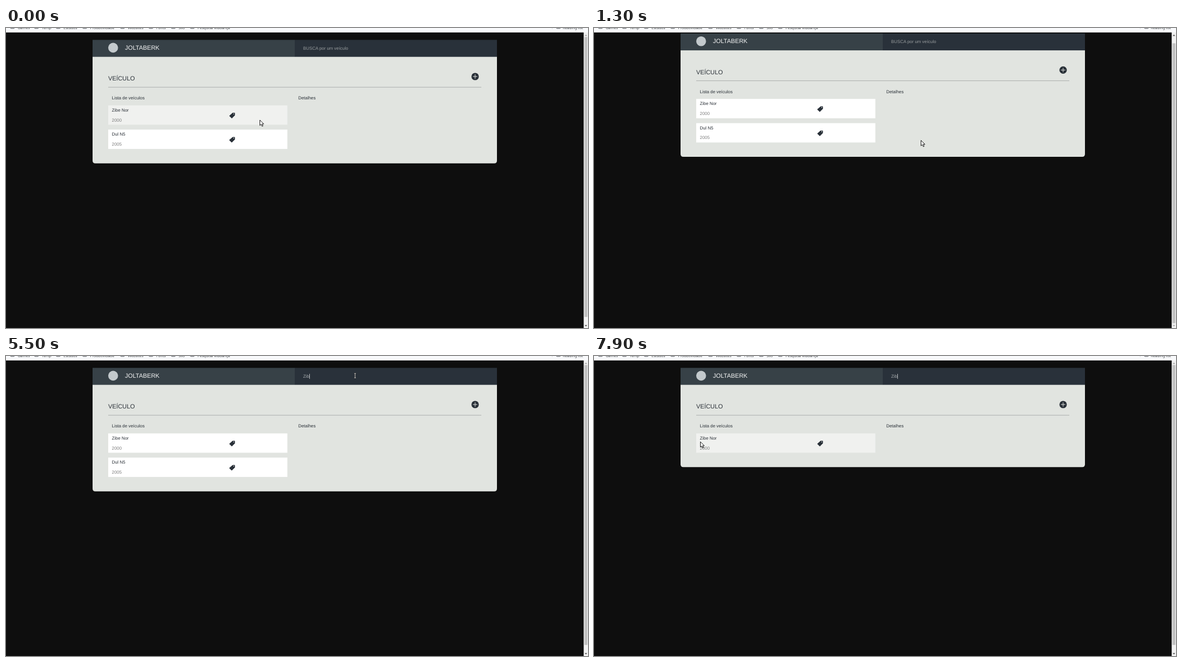
Write an HTML page that moves like this. It is 1042 px wide and 538 px high and loops after 8000 ms.

```html
<!DOCTYPE html>
<html lang="pt">
<head>
<meta charset="utf-8">
<title>Lista de veículos</title>
<style>
html, body { margin: 0; width: 100%; height: 100%; overflow: hidden; background: #0e0e0e; }
svg { display: block; width: 100%; height: 100%; }
text { font-family: "Liberation Sans", Arial, sans-serif; font-size: 7.88px; fill: #2b3138; text-rendering: geometricPrecision; white-space: pre; }
.big { font-size: 10.87px; }
.year { fill: #7c7c7c; }
#marks text { font-family: "Noto Sans", sans-serif; font-size: 6.6px; fill: #3c4043; }
</style>
</head>
<body>
<svg viewBox="0 0 1042 538" xmlns="http://www.w3.org/2000/svg">
  <defs>
    <clipPath id="view"><rect y="8" width="1034.3" height="530"/></clipPath>
    <path id="tag" d="M1 -4.3H4.4V-.7L-.6 4.3L-4.5 .6Z" fill="#293038" stroke="#293038" stroke-width="1.2" stroke-linejoin="round"/>
  </defs>
  <rect width="1042" height="538" fill="#0e0e0e"/>
  <g clip-path="url(#view)">
    <g id="page">
      <path id="card" fill="#e1e4e0"/>
      <rect x="155" y="21.3" width="362.2" height="30.4" fill="#374147"/>
      <rect x="517" y="21.3" width="362" height="30.4" fill="#29313a"/>
      <circle cx="191.8" cy="35.4" r="8.8" fill="#c3c9cc"/>
      <text class="big" x="213" y="39.1" style="fill:#f4f5f5">JOLTABERK</text>
      <text id="query" x="532" y="39.1"/>
      <rect id="caret" y="32" width="0.8" height="9" fill="#d8dadb"/>
      <text class="big" x="183" y="94.2">VEÍCULO</text>
      <circle cx="839.9" cy="87" r="6.6" fill="#293038"/>
      <path d="M836 87h7.8M839.9 83.1v7.8" stroke="#e1e4e0" stroke-width="1"/>
      <path d="M183 106.2H851" stroke="#a6aaa9" stroke-width="0.9"/>
      <text x="189.5" y="128.3">Lista de veículos</text>
      <text x="523.3" y="128.3">Detalhes</text>
      <g id="rows"></g>
    </g>
    <rect id="shade" y="8" width="1034.3" height="530" opacity="0.65"/>
    <g id="spinner" fill="#f0f0f0"></g>
  </g>
  <rect width="1042" height="8" fill="#f9fafc"/>
  <g id="marks"></g>
  <rect x="1034.3" y="8" width="7.7" height="530" fill="#f1f1f1"/>
  <rect id="thumb" x="1035.7" width="5.3" height="502" fill="#c1c1c1"/>
  <path id="up" d="M1036 14.2L1038.3 11.8L1040.6 14.2Z"/>
  <path id="down" d="M1036 532.8L1038.3 535.2L1040.6 532.8Z"/>
  <path id="arrow" d="M0 0V9.7L2.3 7.7L4 11.3L5.6 10.6L4 7.1H7Z" fill="#fff" stroke="#000" stroke-width="0.9" stroke-linejoin="round"/>
  <g id="beam" fill="none">
    <path d="M-2 -4H2M-2 4H2M0 -4V4" stroke="#000" stroke-width="1.9"/>
    <path d="M-1.6 -4H1.6M-1.6 4H1.6M0 -4V4" stroke="#fff" stroke-width="0.9"/>
  </g>
</svg>
<script>
const LOOP = 8000, STEP = 100;
const $ = id => document.getElementById(id);
const set = (el, attrs) => { for (const k in attrs) el.setAttribute(k, attrs[k]); };
const show = (el, on) => set(el, { visibility: on ? "visible" : "hidden" });
const make = (parent, tag, attrs, text) => {
  const el = document.createElementNS("http://www.w3.org/2000/svg", tag);
  set(el, attrs);
  if (text) el.textContent = text;
  return parent.appendChild(el);
};

// Bookmark bar, cut off by the top edge
const folders = { Games: 21, Temp: 64, Estudos: 103, Produtividade: 150.5, Websites: 218, Fonts: 269, Silo: 309, "Pesquisa Mudança": 343 };
const icon = x => make($("marks"), "rect", { x, y: -5, width: 7, height: 5.8, rx: 0.8, fill: "none", stroke: "#50555a", "stroke-width": 1 });
for (const [name, x] of Object.entries(folders)) {
  icon(x - 13);
  make($("marks"), "text", { x, y: 1.5 }, name);
}
make($("marks"), "path", { d: "M978 0V2", stroke: "#c4c7ca", "stroke-width": 0.6 });
icon(985.5);
make($("marks"), "text", { x: 997, y: 1.5 }, "Reading list");

// Vehicle list
const ROW = { x: 183, y: 138.8, w: 320.7, h: 34.7, gap: 43.4 };
const rows = [["Zibe Nor", "2000"], ["Dul N5", "2005"]].map(([name, year], i) => {
  const y = ROW.y + i * ROW.gap;
  const g = make($("rows"), "g", {});
  const box = make(g, "rect", { x: ROW.x, y, width: ROW.w, height: ROW.h });
  make(g, "text", { x: 189.5, y: y + 11.2 }, name);
  make(g, "text", { x: 189.5, y: y + 28.7, class: "year" }, year);
  make(g, "use", { href: "#tag", x: 404.9, y: y + 18.2 });
  make(g, "circle", { cx: 407.7, cy: y + 15.3, r: 0.8, fill: "#fff" });
  return { g, box, y };
});

// Loading ring: dot sizes clockwise from the right
[0, 2.8, 3.1, 2.9, 1.2, 0.5, 0, 0].forEach((r, i) => {
  const a = i * Math.PI / 4;
  make($("spinner"), "circle", { cx: 516.9 + 10.7 * Math.cos(a), cy: 273.2 + 10.7 * Math.sin(a), r });
});
set($("spinner").firstChild, { cx: 527.4, r: 0.8 });

// Pointer moves: start, end, x, y
const start = [454.5, 165];
const moves = [
  [200, 500, 590, 190], [600, 800, 585.5, 201.5], [1600, 1800, 450, 207.5],
  [1900, 2000, 428, 204.5], [2300, 2300, 463.5, 186], [2400, 2400, 590, 100],
  [2700, 2700, 625, 35.2], [7000, 7000, 618.8, 38], [7200, 7200, 480, 112],
  [7300, 7300, 276.5, 182], [7500, 7600, 190.5, 157], [7900, 7900, 190.5, 153.8]
];
const scrolls = [[0, 0], [1000, 5.2], [1100, 10.4], [1200, 11.6], [1400, 8], [1500, 3], [1600, 0]];
const typed = [[0, ""], [5200, "Z"], [5300, "Zi"], [5500, "Zib"]];
const blinks = [[0, 0], [3200, 1], [3700, 0], [4200, 1], [4900, 0], [5200, 1], [6100, 0], [6600, 1], [7200, 0], [7900, 1]];
const widths = [0, 4.8, 6.6, 11];

const held = (keys, t) => keys.filter(k => k[0] <= t).pop()[1];

function pointer(t) {
  let [x, y] = start;
  for (const [from, to, tx, ty] of moves) {
    if (t < from) break;
    const p = Math.min(1, (t - from + STEP) / (to - from + STEP));
    x += (tx - x) * p;
    y += (ty - y) * p;
  }
  return [x, y];
}

function draw(time) {
  const t = Math.floor(time % LOOP / STEP) * STEP;
  const scroll = held(scrolls, t);
  const query = held(typed, t);
  const loading = t === 6000;
  const filtered = t >= 6100;
  const [x, y] = pointer(t);
  const inSearch = x > 517 && y < 51;

  set($("page"), { transform: `translate(0 ${-scroll})` });
  set($("thumb"), { y: 16.2 + scroll * 0.97 });
  set($("up"), { fill: scroll > 0 ? "#505050" : "#a3a3a3" });
  set($("down"), { fill: scroll > 11 ? "#a3a3a3" : "#505050" });

  const bottom = filtered ? 199.3 : 242.7;
  set($("card"), { d: `M155 51H879V${bottom - 5}q0 5 -5 5H160q-5 0 -5 -5Z` });
  rows.forEach((row, i) => {
    const dy = y + scroll - row.y;
    const over = x > ROW.x && x < ROW.x + ROW.w && dy > 0 && dy < ROW.h;
    set(row.box, { fill: over ? "#f0f1ef" : "#fff" });
    show(row.g, !(i && filtered));
  });

  $("query").textContent = query || "BUSCA por um veículo";
  $("query").style.fill = query ? "#a9adb0" : "#999d9f";
  set($("caret"), { x: 532.2 + widths[query.length] });
  show($("caret"), held(blinks, t));
  show($("shade"), loading);
  show($("spinner"), loading);

  show($("arrow"), !inSearch);
  show($("beam"), inSearch);
  set($(inSearch ? "beam" : "arrow"), { transform: `translate(${x} ${y})` });
}

const begin = performance.now();
function tick() {
  draw(performance.now() - begin);
  requestAnimationFrame(tick);
}
tick();
</script>
</body>
</html>
```
